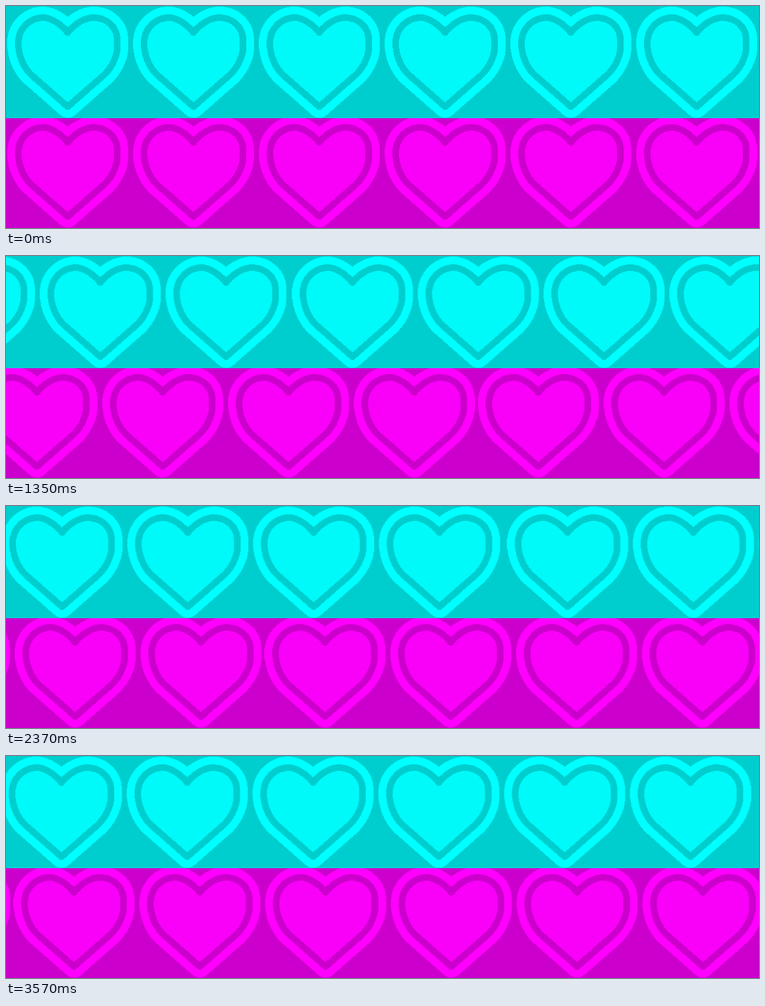
Animation of 1257x372 px, one loop 3.6 s. Source, as an HTML page without scripts:

```html
<!DOCTYPE html>
<html lang="en">
<head>
<meta charset="utf-8">
<title>Scrolling hearts</title>
<style>
  html, body { margin: 0; width: 100%; height: 100%; overflow: hidden; }
  svg { display: block; overflow: hidden; shape-rendering: crispEdges; }

  .cyan    { --ground: #00cece; --rim: #00ffff; --fill: #00f9f9; }
  .magenta { --ground: #cc00cc; --rim: #ff00ff; --fill: #f900f9; }

  .ground { fill: var(--ground); }
  .rim  { fill: var(--rim); stroke: var(--rim); stroke-width: 37; stroke-linejoin: round; }
  .core { fill: var(--fill); stroke: var(--ground); stroke-width: 11; stroke-linejoin: round; }

  .strip { animation: slide 3600ms steps(120) infinite; }
  .enter-left  { --from: -1257px; --to: 0px; }
  /* slightly faster, so the gap between the two strips widens */
  .exit-right  { --from: 0px; --to: 1267.56px; }
  .exit-left   { --from: 0px; --to: -1257px; }
  .enter-right { --from: 1257px; --to: 0px; }

  @keyframes slide {
    from { transform: translateX(var(--from)); }
    to   { transform: translateX(var(--to)); }
  }
</style>
</head>
<body>
<svg width="1257" height="372" viewBox="0 0 1257 372">
  <defs>
    <path id="outline" d="M103 44.5
      C91 29.1 74 19.5 62 19.5 C39 19.5 20.5 38.5 20.5 62
      C20.5 88 33 107 43 116 L103 168.8 L163 116
      C173 107 185.5 88 185.5 70 V57
      C185.5 35 168 19.5 146 19.5 C132 19.5 115 29.1 103 44.5 Z"/>
    <g id="heart">
      <use href="#outline" class="rim"/>
      <use href="#outline" class="core"/>
    </g>
    <g id="trio">
      <use href="#heart"/>
      <use href="#heart" x="210"/>
      <use href="#heart" x="420"/>
    </g>
    <g id="row">
      <use href="#trio"/>
      <use href="#trio" x="630"/>
    </g>
  </defs>

  <svg class="cyan" width="1257" height="188">
    <rect class="ground" width="1257" height="188"/>
    <g class="strip enter-left"><use href="#row"/></g>
    <g class="strip exit-right"><use href="#row"/></g>
  </svg>

  <svg class="magenta" y="188" width="1257" height="184">
    <rect class="ground" width="1257" height="184"/>
    <g class="strip exit-left"><use href="#row" y="-4"/></g>
    <g class="strip enter-right"><use href="#row" y="-4"/></g>
  </svg>
</svg>
</body>
</html>
```
